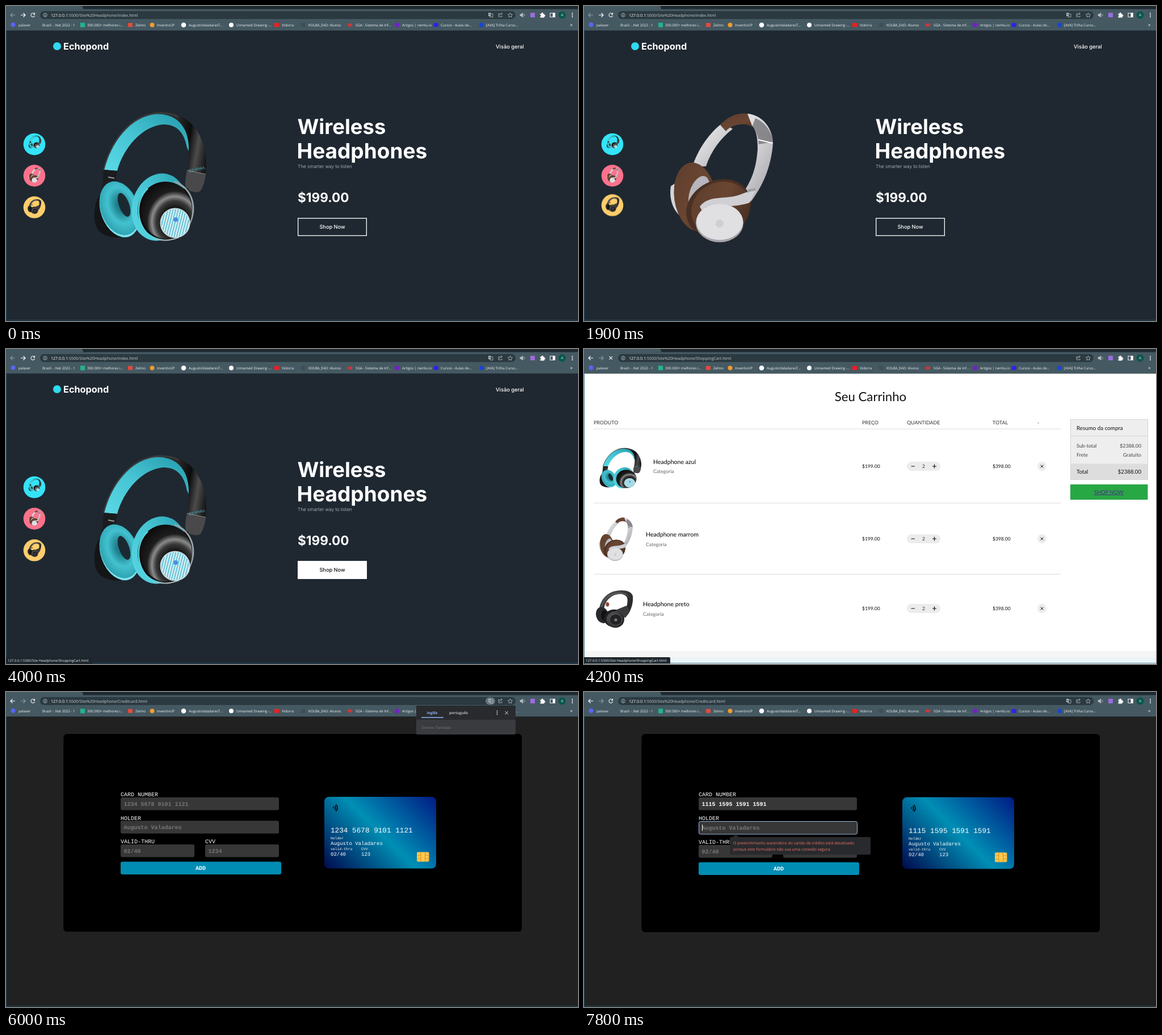
These frames come from a looping animation (1008x556 px, 8 s). An HTML page:

```html
<!DOCTYPE html>
<html lang="pt-BR">
<head>
<meta charset="utf-8">
<title>Headphone shop</title>
<style>
html, body { margin: 0; width: 100%; height: 100%; overflow: hidden; background: #1f2831; }
svg { display: block; }
text { text-rendering: geometricPrecision; white-space: pre; }
.ui { font-family: "Open Sans", "Noto Sans", sans-serif; fill: #f1f4f5; }
.url { font-size: 7.1px; fill: #c4ccd0; }
.marks { font-size: 6.2px; }
.status text { font-size: 6px; }
.pop { font-family: Inter, sans-serif; fill: #fff; }
.lato { font-family: Lato, sans-serif; fill: #111; font-size: 8.5px; }
.mono { font-family: "Liberation Mono", "Courier New", monospace; fill: #fff; font-size: 10px; }
.hint { fill: #777; }
.b { font-weight: 700; }
.mid { text-anchor: middle; }
.end { text-anchor: end; }
.line { fill: none; stroke: #dfe5e8; stroke-width: 1.2; }
.thin { fill: none; stroke: #bcc6cb; stroke-width: .8; }
.dim { opacity: .4; }

/* every state change is a hard cut on one 8 s loop */
.a { animation: 8s step-end infinite; }
.home { animation-name: home; }
.cart { animation-name: cart; }
.pay { animation-name: pay; }
@keyframes home { 0% { opacity: 1 } 52.5%, to { opacity: 0 } }
@keyframes cart { 0% { opacity: 0 } 52.5% { opacity: 1 } 75%, to { opacity: 0 } }
@keyframes pay { 0% { opacity: 0 } 75%, to { opacity: 1 } }

.heroBlue { animation-name: heroBlue; }
.heroBrown { animation-name: heroBrown; }
.heroBlack { animation-name: heroBlack; }
@keyframes heroBlue { 0% { opacity: 1 } 16.25% { opacity: 0 } 33.75%, to { opacity: 1 } }
@keyframes heroBrown { 0% { opacity: 0 } 16.25% { opacity: 1 } 26.25%, to { opacity: 0 } }
@keyframes heroBlack { 0% { opacity: 0 } 26.25% { opacity: 1 } 33.75%, to { opacity: 0 } }

.thumb { animation: 8s ease infinite; }
.t1 { animation-name: t1; }
.t2 { animation-name: t2; }
.t3 { animation-name: t3; }
@keyframes t1 { 0%, 29%, 42.5%, to { transform: none } 35%, 35.6% { transform: translateY(-4px) } }
@keyframes t2 { 0%, 13.1%, 23.6%, to { transform: none } 17.5% { transform: translateY(-4px) } }
@keyframes t3 { 0%, 19.5%, 33.5%, to { transform: none } 26%, 27% { transform: translateY(-4px) } }

.shopOn { animation-name: shopOn; }
.buyOn { animation-name: buyOn; }
@keyframes shopOn { 0% { opacity: 0 } 45%, to { opacity: 1 } }
@keyframes buyOn { 0% { opacity: 0 } 65%, to { opacity: 1 } }
.link1 { animation-name: link1; }
.link2 { animation-name: link2; }
@keyframes link1 { 0% { opacity: 0 } 48.75% { opacity: .5 } 50% { opacity: 1 } 56.25% { opacity: .5 } 57.5%, to { opacity: 0 } }
@keyframes link2 { 0% { opacity: 0 } 72.5% { opacity: .8 } 73.75% { opacity: .5 } 75%, to { opacity: 0 } }
.busy { animation-name: busy; }
.idle { animation-name: idle; }
@keyframes busy { 0% { opacity: 1 } 53.75% { opacity: 0 } 72.5%, to { opacity: 1 } }
@keyframes idle { 0% { opacity: 0 } 53.75% { opacity: 1 } 72.5%, to { opacity: 0 } }

.offer { animation-name: offer; }
.low { animation-name: low; }
.numFocus { animation-name: numFocus; }
.num0 { animation-name: num0; }
.num1 { animation-name: num1; }
.num2 { animation-name: num2; }
.warn { animation-name: warn; }
@keyframes offer { 0% { opacity: 0 } 75% { opacity: 1 } 86.25%, to { opacity: 0 } }
@keyframes low { 0% { transform: none } 87.5%, to { transform: translateY(var(--d, 1px)) } }
@keyframes numFocus { 0% { opacity: 0 } 87.5% { opacity: 1 } 97.5%, to { opacity: 0 } }
@keyframes num0 { 0% { opacity: 1 } 92.5%, to { opacity: 0 } }
@keyframes num1 { 0% { opacity: 0 } 92.5% { opacity: 1 } 93.75%, to { opacity: 0 } }
@keyframes num2 { 0% { opacity: 0 } 93.75%, to { opacity: 1 } }
@keyframes warn { 0% { opacity: 0 } 97.5%, to { opacity: 1 } }
</style>
</head>
<body>
<svg width="1008" height="556" viewBox="0 0 1008 556">
<defs>
  <linearGradient id="teal" x1="0" y1="1" x2="1" y2="0"><stop stop-color="#5ad9e6"/><stop offset=".5" stop-color="#45c3d2"/><stop offset="1" stop-color="#239aab"/></linearGradient>
  <radialGradient id="pad" cx=".56" cy=".46" r=".56"><stop offset=".2" stop-color="#1e7f8c"/><stop offset=".6" stop-color="#43c1cf"/><stop offset="1" stop-color="#2fa3b2"/></radialGradient>
  <linearGradient id="shell" x1="0" y1=".3" x2="1" y2=".5"><stop offset=".5" stop-color="#2a2a2b"/><stop offset=".72" stop-color="#0c0c0c"/><stop offset=".86" stop-color="#4c4c4d"/><stop offset="1" stop-color="#1a1a1a"/></linearGradient>
  <radialGradient id="cup" cx=".66" cy=".7" r=".8"><stop offset=".32" stop-color="#161616"/><stop offset=".46" stop-color="#3a3a3a"/><stop offset=".56" stop-color="#8b8b8b"/><stop offset=".68" stop-color="#1d1d1d"/><stop offset="1" stop-color="#0a0a0a"/></radialGradient>
  <linearGradient id="silver" x1="0" y1="0" x2="1" y2="1"><stop stop-color="#f3f3f5"/><stop offset=".55" stop-color="#cfcfd3"/><stop offset="1" stop-color="#9c9ca2"/></linearGradient>
  <linearGradient id="brown" x1="0" y1="0" x2="1" y2="1"><stop stop-color="#5c3d2c"/><stop offset=".5" stop-color="#6a4632"/><stop offset="1" stop-color="#3d271b"/></linearGradient>
  <linearGradient id="coal" x1="0" y1="0" x2="1" y2="1"><stop stop-color="#5d5d60"/><stop offset=".5" stop-color="#333336"/><stop offset="1" stop-color="#202022"/></linearGradient>
  <linearGradient id="bank" gradientUnits="userSpaceOnUse" x1="579" y1="329" x2="740" y2="167"><stop stop-color="#000a4e"/><stop offset=".5" stop-color="#008fb5"/><stop offset="1" stop-color="#001a83"/></linearGradient>
  <pattern id="ribs" width="4.4" height="4.4" patternUnits="userSpaceOnUse" patternTransform="rotate(14)"><path d="M0 0h1.9v4.4H0z" fill="#e6fafd"/></pattern>

  <g id="blue">
    <path d="M235 197C265 181 303 184 327 208C347 229 355 262 353 286C351 306 347 320 343 326C338 331 326 328 319 323C314 318 316 305 319 290C322 276 323 265 322 252C319 214 300 194 262 192Z" fill="url(#shell)"/>
    <path d="M319 290L352 297C351 308 347 320 343 326C338 331 326 328 319 323C314 318 316 305 319 290Z" fill="#49494b"/>
    <path d="M172 289C183 245 215 196 262 191C302 188 324 216 322 256L319 250C314 224 302 209 277 209C240 212 207 250 196 291Z" fill="url(#teal)"/>
    <path d="M172 289C183 245 215 193 268 189Q290 188 304 196" fill="none" stroke="#3a3d3f" stroke-width="2.5"/>
    <path d="M319 290l33 7" stroke="#8a8a8a"/>
    <text transform="translate(350 283) rotate(168)" font-family="Inter, sans-serif" font-size="7" fill="#3fb9c8">Velun 02</text>
    <path d="M318 322Q319 336 307 345" fill="none" stroke="#0b0b0b" stroke-width="6"/>
    <path d="M172 289l24 2l-4 24l-28 26l6-26z" fill="#1b1c1e"/><path d="M180 302l11 2" stroke="#999" stroke-width="2"/>
    <path d="M165 334C154 350 152 382 163 396C175 410 200 411 214 406L180 340Z" fill="#141516"/>
    <ellipse cx="200" cy="360" rx="33" ry="50" transform="rotate(-20 200 360)" fill="#7be3ee"/>
    <ellipse cx="200" cy="357" rx="33" ry="49" transform="rotate(-20 200 357)" fill="url(#pad)"/>
    <ellipse cx="208" cy="351" rx="9" ry="22" transform="rotate(-20 208 351)" fill="#1b2a32"/>
    <ellipse cx="270" cy="355" rx="48" ry="60" transform="rotate(14 270 355)" fill="url(#teal)"/>
    <ellipse cx="281" cy="361" rx="49" ry="51" fill="#0c0c0d"/>
    <path d="M250 322C224 345 230 396 262 411" fill="none" stroke="#57d3df" stroke-width="2.5"/>
    <path d="M297 310C330 322 340 360 318 394" fill="none" stroke="#9aa3a6" stroke-width="3"/>
    <ellipse cx="283" cy="361" rx="45" ry="50" fill="url(#cup)"/>
    <path d="M262 411Q285 417 305 408" fill="none" stroke="#aeb6b9" stroke-width="2"/>
    <circle cx="298" cy="383" r="26.5" fill="#c8dde2"/><circle cx="298" cy="383" r="24.5" fill="#72c4d6"/><circle cx="298" cy="383" r="24.5" fill="url(#ribs)"/>
    <circle cx="299" cy="377" r="4" fill="#4b8fe0"/>
  </g>

  <g id="brownPair">
    <path d="M153 318l12-8l4 60C155 358 150 338 153 318Z" fill="#d5d5d8"/>
    <path d="M191 284C200 254 222 222 245 206L262 217C240 234 224 256 215 283Z" fill="url(#silver)"/>
    <path d="M240 210C254 194 271 188 287 190C302 191 313 202 320 215L296 213C280 204 258 211 250 221Z" fill="url(#brown)"/>
    <path d="M288 190C316 193 332 216 333 242C330 285 314 320 292 348L245 350L276 335C296 310 304 284 306 252C306 230 303 218 296 211Z" fill="url(#silver)"/>
    <path d="M302 198C319 205 331 222 333 240L308 244C307 229 303 220 297 211Z" fill="#6f6f73" opacity=".75"/>
    <path d="M307 236l25 6" stroke="#fff" stroke-width="2"/>
    <ellipse cx="196" cy="337" rx="37" ry="61" transform="rotate(-8 196 337)" fill="url(#brown)"/>
    <ellipse cx="203" cy="331" rx="17" ry="32" transform="rotate(18 203 331)" fill="#b7b5bd"/>
    <ellipse cx="237" cy="356" rx="59" ry="48" transform="rotate(-27 237 356)" fill="#4a3022"/>
    <ellipse cx="241" cy="358" rx="53" ry="47" transform="rotate(-25 241 358)" fill="url(#brown)"/>
    <path d="M204 354C220 333 247 342 272 334L304 322L292 347C265 357 235 350 209 363Z" fill="#d0d0d4"/>
    <ellipse cx="239" cy="383" rx="42" ry="34" fill="#a5a5aa"/><ellipse cx="239" cy="381" rx="41" ry="32" fill="#e0e0e3"/>
    <circle cx="239" cy="384" r="7" fill="#cfcfd2"/>
    <text transform="translate(283 330) rotate(-12)" font-family="Inter, sans-serif" font-size="6" fill="#555">NURVA</text>
  </g>

  <g id="black">
    <path d="M171 318C171 258 205 211 257 199C297 190 340 195 350 225C354 261 342 302 322 331L302 321C319 291 326 256 320 235C306 207 266 213 242 226C209 247 198 275 198 305Z" fill="url(#coal)"/>
    <path d="M182 294C190 248 222 218 262 211C291 207 315 211 326 228" fill="none" stroke="#777" stroke-width="3"/>
    <ellipse cx="189" cy="331" rx="33" ry="45" transform="rotate(-15 189 331)" fill="#29292b"/>
    <ellipse cx="200" cy="333" rx="18" ry="29" fill="#111113"/>
    <ellipse cx="216" cy="272" rx="9" ry="12" fill="#8c4934"/>
    <ellipse cx="251" cy="348" rx="54" ry="48" fill="#1e1e20"/>
    <path d="M260 303l55-23l21 28l-24 36l-45-8z" fill="#3b3b3e"/>
    <ellipse cx="258" cy="355" rx="47" ry="45" fill="url(#coal)"/>
    <ellipse cx="260" cy="356" rx="33" ry="31" fill="#222224" stroke="#68686b" stroke-width="3"/>
    <circle cx="260" cy="357" r="8" fill="#77777a"/>
  </g>

  <path id="arrow" d="M4 0H-4M-.5-3.5L-4 0L-.5 3.5" fill="none" stroke="#fff" stroke-width="1.2"/>
  <g id="reload"><path d="M50.2 14A3.4 3.4 0 1 0 50.6 17" class="line"/><path d="M51 11.6v3.6h-3.6z" fill="#fff"/></g>
  <g id="translate"><path d="M850 12h4.5v6H850z" fill="#aab5bb"/><path d="M855 14h3v5.5h-5v-2" class="thin"/><path d="M851 15h2.5" stroke="#2b3a41"/></g>
  <path id="stop" d="M44.5 13l5.5 5.5M50 13l-5.5 5.5" class="line"/>

  <g id="item">
    <text x="490" y="3">$199.00</text>
    <rect x="569" y="-8" width="59" height="16" rx="8" fill="#ececec"/>
    <path d="M576.5 0h6.5M614 0h7M617.5 -3.5v7" stroke="#111" stroke-width="1.2"/>
    <text class="mid" x="598.5" y="3" fill="#333">2</text>
    <text x="720" y="3">$398.00</text>
    <circle cx="807" cy="0" r="8" fill="#ececec"/>
    <path d="M804.5 -2.5l5 5m0 -5l-5 5" stroke="#111"/>
  </g>
</defs>

<!-- browser frame -->
<g class="ui">
  <path fill="#1e2a30" d="M0 0h1008v8H0z"/>
  <path fill="#455962" d="M0 0h132q4 0 4 5.5h872v38H0z"/>
  <rect x="60" y="9" width="838" height="14" rx="7" fill="#2b3a41"/>
  <circle cx="69" cy="16" r="3.3" class="thin"/><path d="M69 15.5v2.5M69 13.6v.9" stroke="#dfe5e8"/>
  <path d="M870 13.5h-2v5.5h6v-2M869.5 17q.5-3.5 4-3.5m-1.500-2l2.5 2l-2.5 2" class="thin"/>
  <path d="M888.5 12l1.200 2.700l2.900.3l-2.200 2l.6 2.900l-2.500-1.500l-2.500 1.500l.6-2.900l-2.200-2l2.900-.3z" class="thin"/>
  <path d="M906 14.5h2l2.500-2.500v8l-2.500-2.500h-2zM912 13v6M914 14v4" fill="#b9c2c7" stroke="#b9c2c7" stroke-width=".6"/>
  <rect x="924" y="12" width="8" height="8" fill="#9b6be0"/>
  <path d="M941.5 13.5h2q0-2 1.500-2t1.500 2h2v2q2 0 2 1.500t-2 1.500v2h-7v-2.500q1.500 0 1.500-1t-1.500-1z" fill="#fff"/>
  <path d="M959 12.5h8v7h-8z" class="line"/><path d="M963.5 12h4v8h-4z" fill="#fff"/>
  <circle cx="980" cy="16" r="6.5" fill="#07574e"/><text class="mid" x="980" y="18.3" font-size="6.5">A</text>
  <g fill="#fff"><circle cx="998" cy="13" r="1"/><circle cx="998" cy="16" r="1"/><circle cx="998" cy="19" r="1"/></g>
  <g class="marks">
    <circle cx="12.5" cy="33" r="4" fill="#5865f2"/><text x="22" y="35.5">palaver</text>
    <text x="64" y="35.5">Brazil - .Net 2022 - 1</text>
    <rect x="131" y="29.5" width="8" height="8" fill="#22b48c"/><text x="143" y="35.5">300.000+ melhores i...</text>
    <rect x="215" y="30" width="8" height="7" fill="#e34a3c"/><text x="228" y="35.5">Zelmo</text>
    <circle cx="257.5" cy="33.5" r="4" fill="#f39a2b"/><text x="266" y="35.5">InventivUP</text>
    <circle cx="313" cy="33.5" r="4.3" fill="#fff"/><text x="322" y="35.5">AugustoValadaresT...</text>
    <circle cx="397" cy="33.5" r="4" fill="#fff"/><text x="406" y="35.5">Unnamed Drawing -...</text>
    <rect x="473" y="30" width="8" height="7" fill="#f21d1d"/><text x="486" y="35.5">Vidorra</text>
    <rect x="520" y="30" width="7" height="7" fill="#3b4e59"/><text x="533" y="35.5">KOLBA_EAD: Alunos</text>
    <rect x="602" y="31" width="8" height="5" fill="#c8373a"/><text x="616" y="35.5">SGA - Sistema de Inf...</text>
    <circle cx="689" cy="33.5" r="4" fill="#7420c8"/><text x="698" y="35.5">Artigos | nemlu.io</text>
    <rect x="754" y="30" width="7.5" height="7" fill="#2b22e8"/><text x="766" y="35.5">Cursos - Aulas de...</text>
    <circle cx="838" cy="33.5" r="4" fill="#1746d0"/><text x="846" y="35.5">[AVA] Trilha Curso...</text>
    <text x="994" y="36" font-size="9">»</text>
  </g>
</g>

<!-- shop front -->
<g class="a home">
  <path fill="#1f2831" d="M0 43.5h1008v513H0z"/>
  <use href="#arrow" x="12" y="16" class="dim"/><use href="#arrow" transform="translate(30 16) scale(-1 1)"/>
  <use href="#reload"/><use href="#translate"/>
  <text class="ui url" x="79" y="18.5"><tspan fill="#fff">127.0.0.1</tspan>:5500/Site%20Headphone/index.html</text>
  <g class="pop">
    <circle cx="90" cy="71" r="7" fill="#2fd9ee"/>
    <text class="b" x="101" y="76.5" font-size="16.3">Echopond</text>
    <text x="863" y="75" font-size="9.3" font-weight="500">Visão geral</text>
    <g class="b"><text x="513.5" y="226" font-size="36.5">Wireless</text><text x="512.5" y="268.5" font-size="37">Headphones</text>
    <text x="514" y="346" font-size="22.6">$199.00</text></g>
    <text x="514" y="286" font-size="8.2" font-weight="300" fill="#c9cdd1">The smarter way to listen</text>
    <rect x="514.65" y="374.65" width="120.7" height="30.7" fill="none" stroke="#fff" stroke-width="1.3"/>
    <text class="mid" x="575" y="393" font-size="9.2" font-weight="500">Shop Now</text>
    <g class="a shopOn"><path fill="#fff" d="M514 374h122v32H514z"/><text class="mid" x="575" y="393" font-size="9.2" font-weight="500" fill="#111">Shop Now</text></g>
  </g>
  <use href="#blue" class="a heroBlue"/><use href="#brownPair" class="a heroBrown"/><use href="#black" class="a heroBlack"/>
  <g class="thumb t1"><circle cx="50" cy="244" r="19.3" fill="#33e4f8"/><use href="#blue" transform="translate(22.5 210.5) scale(.112 .098)"/></g>
  <g class="thumb t2"><circle cx="50" cy="299.5" r="19.3" fill="#fc728c"/><use href="#brownPair" transform="translate(22.4 262.8) scale(.116 .118)"/></g>
  <g class="thumb t3"><circle cx="50" cy="355.3" r="19.3" fill="#ffce6b"/><use href="#black" transform="translate(19 316.2) scale(.123 .127)"/></g>
</g>

<!-- cart -->
<g class="a cart">
  <path fill="#fff" d="M0 43.5h1008v513H0z"/><path fill="#f5f5f5" d="M0 533h1008v12H0z"/><path fill="#eaf5f9" d="M152 545h856v10H152z"/>
  <use href="#arrow" x="12" y="16"/><use href="#arrow" transform="translate(30 16) scale(-1 1)" class="dim"/>
  <use href="#stop" class="a busy"/><use href="#reload" class="a idle"/>
  <text class="ui url" x="79" y="18.5"><tspan fill="#fff">127.0.0.1</tspan>:5500/Site%20Headphone/ShoppingCart.html</text>
  <g class="lato">
    <text class="mid" x="505" y="92" font-size="22.2">Seu Carrinho</text>
    <g font-size="8.9" fill="#333"><text x="17" y="133">PRODUTO</text><text x="490" y="133">PREÇO</text><text x="569" y="133">QUANTIDADE</text><text x="720" y="133">TOTAL</text><text x="799" y="133">-</text></g>
    <path d="M17 141h823M17 272h823M17 397.5h823" stroke="#dcdcdc"/>
    <use href="#item" y="207"/><use href="#item" y="335"/><use href="#item" y="458"/>
    <g font-size="10.6" fill="#000"><text x="122" y="202.5">Headphone azul</text><text x="109" y="331">Headphone marrom</text><text x="104" y="454">Headphone preto</text></g>
    <g font-size="8.7" fill="#666"><text x="122" y="219">Categoria</text><text x="109" y="347.5">Categoria</text><text x="104" y="470.5">Categoria</text></g>
    <use href="#blue" transform="translate(-30.4 116) scale(.372 .314)"/>
    <use href="#brownPair" transform="translate(-24.3 233.8) scale(.331 .336)"/>
    <use href="#black" transform="translate(-30.6 363.2) scale(.333 .322)"/>
    <rect x="857.5" y="124.5" width="136" height="106" fill="#eee" stroke="#d4d4d4"/>
    <path fill="#ddd" d="M858 202.5h135v27.5H858z"/><path d="M858 153.5h135" stroke="#d4d4d4"/>
    <text x="868" y="143" font-size="9.8">Resumo da compra</text>
    <g font-size="8.8" fill="#444"><text x="868" y="173.5">Sub-total</text><text x="868" y="189.5">Frete</text><text class="end" x="982" y="173.5">$2388.00</text><text class="end" x="982" y="189.5">Gratuito</text></g>
    <text x="868" y="220" font-size="9.6">Total</text><text class="end" x="982" y="220" font-size="9.6">$2388.00</text>
    <path fill="#28a745" d="M857 239h136.5v27H857z"/><path class="a buyOn" fill="#3cc65d" d="M857 239h136.5v27H857z"/>
    <text class="mid" x="925" y="256" font-size="9.4" fill="#4b2c84" text-decoration="underline">SHOP NOW</text>
  </g>
</g>

<!-- payment form -->
<g class="a pay">
  <path fill="#212121" d="M0 43.5h1008v513H0z"/>
  <use href="#arrow" x="12" y="16"/><use href="#arrow" transform="translate(30 16) scale(-1 1)" class="dim"/><use href="#reload"/>
  <rect class="a offer" x="845" y="9.5" width="17" height="13" rx="6.5" fill="#68757b"/><use href="#translate"/>
  <text class="ui url" x="79" y="18.5"><tspan fill="#fff">127.0.0.1</tspan>:5500/Site%20Headphone/Creditcard.html</text>
  <rect x="101.5" y="74" width="807.5" height="349" rx="6"/><rect class="a low" x="101.5" y="84" width="807.5" height="339" rx="6"/>
  <g class="mono">
    <text x="202" y="184">CARD NUMBER</text><text x="202" y="225.5">HOLDER</text>
    <rect x="202" y="186" width="279" height="22.5" rx="3" fill="#373737"/>
    <rect class="a numFocus" x="202.5" y="186.5" width="279" height="22.5" rx="3" fill="none" stroke="#9cbbe0"/>
    <g class="b"><text class="a num0 hint" x="207.5" y="200.5">1234 5678 9101 1121</text><text class="a num1" x="207.5" y="200.5">1115 1595</text><text class="a num2" x="207.5" y="200.5">1115 1595 1591 1591</text></g>
    <g class="a low">
      <g fill="#373737"><rect x="202" y="227.3" width="279" height="22.5" rx="3"/><rect x="202" y="269" width="130" height="22.5" rx="3"/><rect x="351" y="269" width="130" height="22.5" rx="3"/></g>
      <text x="202" y="267">VALID-THRU</text><text x="351" y="267">CVV</text>
      <g class="b hint"><text x="207.5" y="242">Augusto Valadares</text><text x="207.5" y="283.5">02/40</text><text x="356.5" y="283.5">1234</text></g>
      <rect x="202" y="299.5" width="283" height="22.5" rx="3" fill="#008db3"/><text class="b mid" x="343" y="314">ADD</text>
    </g>
    <g class="a low" style="--d:.7px">
      <rect x="561" y="185" width="197" height="126.5" rx="8" fill="url(#bank)"/>
      <path d="M577 202.5v3M579.5 200.5q2.500 4 0 8M581.5 198.5q5 6 0 12" fill="none" stroke="#000" stroke-width="1.6"/>
      <g font-size="12.7"><text class="a num0" x="572" y="248">1234 5678 9101 1121</text><text class="a num1" x="572" y="248">1115 1595</text><text class="a num2" x="572" y="248">1115 1595 1591 1591</text></g>
      <g font-size="6.4"><text x="572" y="259.5">Holder</text><text x="572" y="279">valid-thru</text><text x="626" y="279">CVV</text></g>
      <g font-size="9"><text x="572" y="269.5">Augusto Valadares</text><text x="572" y="289">02/40</text><text x="626" y="289">123</text></g>
      <rect x="724" y="282.5" width="21.5" height="17" rx="2.5" fill="#ffc64a"/><path d="M724 288h7v-5.5M724 294h7v5.5M731 288v6M745.5 288h-7v-5.5M745.5 294h-7v5.5M738.5 288v6" fill="none" stroke="#c88a24" stroke-width=".8"/>
    </g>
  </g>
  <g class="a warn">
    <rect x="202.5" y="228.5" width="279" height="22.5" rx="3" fill="none" stroke="#9cbbe0"/><path d="M208.5 234v11" stroke="#fff"/>
    <path d="M262 256.5l5.5-5.5l5.5 5.5z" fill="#292a2d"/><rect x="257" y="256" width="248" height="31" rx="2" fill="#292a2d"/>
    <g class="ui" font-size="6.9" style="fill:#ee7768"><text x="263" y="268.5">O preenchimento automático do cartão de crédito está desativado</text><text x="263" y="279.5">porque este formulário não usa uma conexão segura.</text></g>
  </g>
  <g class="a offer ui" font-size="6.5">
    <rect x="723" y="24" width="175" height="51" rx="2" fill="#3a3b3e"/><path d="M723 26q0-2 2-2h171q2 0 2 2v23H723z" fill="#292a2d"/>
    <text class="b mid" x="751" y="39" fill="#8ab4f8">inglês</text><path d="M732 45h39" stroke="#8ab4f8" stroke-width="1.5"/>
    <text class="b mid" x="797.5" y="39" fill="#b5b8bc">português</text>
    <g fill="#ddd"><circle cx="865.5" cy="33.5" r=".9"/><circle cx="865.5" cy="36.5" r=".9"/><circle cx="865.5" cy="39.5" r=".9"/></g>
    <path d="M879.5 34l5.5 5.5m0-5.5l-5.5 5.5" stroke="#ddd"/>
    <text x="732" y="65" style="fill:#77797c">Dovexo Translate</text>
  </g>
</g>

<path d="M.5 43.5V556M0 554.5h1008" fill="none" stroke="#25566a" stroke-opacity=".75"/>
<g class="ui status">
  <g class="a link1"><path fill="#1d262c" d="M0 544h150q2 0 2 2v9.5H0z"/><text x="3" y="551.5">127.0.0.1:5500/Site Headphone/ShoppingCart.html</text></g>
  <g class="a link2"><path fill="#1d262c" d="M0 544h140q2 0 2 2v9.5H0z"/><text x="3" y="551.5">127.0.0.1:5500/Site Headphone/Creditcard.html</text></g>
</g>
</svg>
</body>
</html>
```
